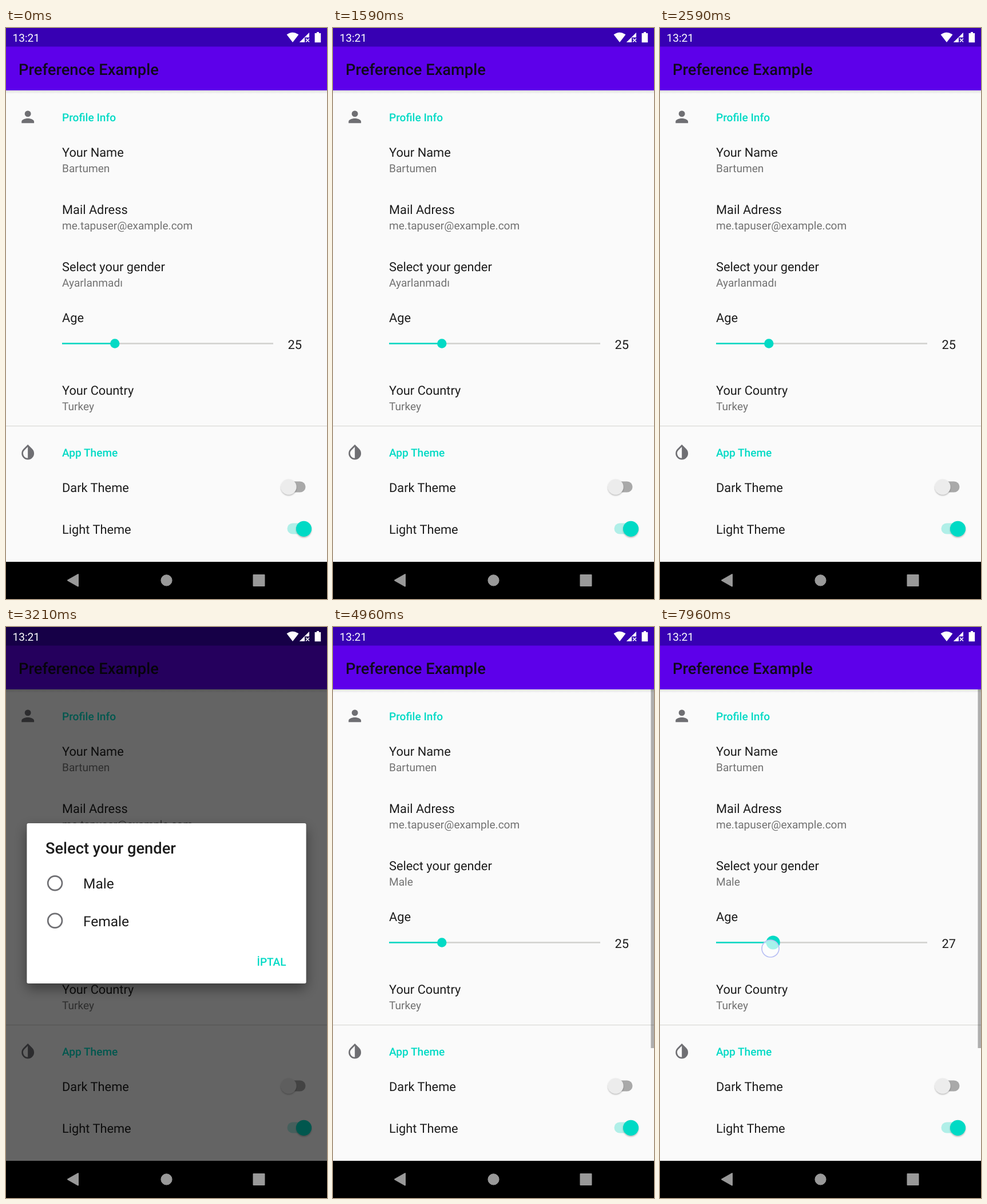
An HTML page for the animation above (8000 ms loop, 561 px wide and 998 px high).

```html
<!DOCTYPE html>
<html lang="en">
<head>
<meta charset="utf-8">
<title>Preference screen</title>
<style>
  html, body { margin: 0; width: 100%; height: 100%; overflow: hidden; background: #000; }
  svg { display: block; width: 100%; height: 100%; }
  text { font: 400 21.8px Roboto, sans-serif; fill: #1d1d1d; text-rendering: geometricPrecision; }
  .sum { font-size: 19.1px; fill: #727272; }
  .cat { font-size: 19.1px; font-weight: 500; fill: #03dac5; }
  .title { font-size: 27.27px; font-weight: 500; fill: #100a1c; }
  .item { font-size: 24.5px; }
  .icon { fill: #6f6f73; }
  .teal { fill: #03dac5; }
</style>
</head>
<body>
<svg viewBox="0 0 561 998">
  <defs>
    <filter id="soft" x="-50%" y="-50%" width="200%" height="200%">
      <feDropShadow dx="0" dy="1.5" stdDeviation="1.3" flood-opacity=".3"/>
    </filter>
    <filter id="deep" x="-20%" y="-20%" width="140%" height="150%">
      <feDropShadow dx="0" dy="9" stdDeviation="11" flood-opacity=".42"/>
    </filter>
    <linearGradient id="edge" x2="0" y2="1">
      <stop stop-opacity=".12"/><stop offset="1" stop-opacity="0"/>
    </linearGradient>
  </defs>

  <rect width="561" height="933" fill="#fafafa"/>
  <rect y="109" width="561" height="6" fill="url(#edge)"/>
  <rect y="32" width="561" height="77" fill="#5d00ea"/>
  <rect width="561" height="32.5" fill="#3700b3"/>
  <text class="title" x="22" y="81.5">Preference Example</text>

  <path class="icon" transform="translate(21.8 139) scale(1.364)"
    d="M12 12a4 4 0 1 0 0-8 4 4 0 0 0 0 8zm0 2c-2.67 0-8 1.34-8 4v2h16v-2c0-2.66-5.33-4-8-4z"/>
  <path class="icon" transform="translate(21.8 725) scale(1.364)"
    d="M17.66 7.93L12 2.27 6.34 7.93a8 8 0 0 0 11.32 11.31 8 8 0 0 0 0-11.31zM12 19.59a6 6 0 0 1-4.24-10.24L12 5.1z"/>
  <g id="prefs"></g>

  <path d="M98 551.5H467" stroke="#d0d0ce" stroke-width="2.7"/>
  <path id="fill" stroke="#03dac5" stroke-width="2.7"/>
  <circle id="thumb" class="teal" cy="551.5"/>
  <text id="age" x="492.5" y="560.5"></text>
  <path d="M0 695.6H561" stroke="#d9d9d6" stroke-width="1.4"/>

  <rect x="490.5" y="792.5" width="33" height="19" rx="9.5" fill="#a9a9a9"/>
  <circle cx="494" cy="802" r="13.6" fill="#ececec" filter="url(#soft)"/>
  <rect x="491.5" y="865.5" width="33" height="19" rx="9.5" fill="#b0efe8"/>
  <circle class="teal" cx="520.5" cy="875.3" r="13.6" filter="url(#soft)"/>
  <rect id="bar" x="555.5" y="109" width="5.5" height="627" fill-opacity=".3"/>

  <rect id="dim" width="561" height="933"/>
  <g id="dialog">
    <rect x="36.5" y="343" width="488" height="280" rx="2.7" fill="#fff" filter="url(#deep)"/>
    <rect id="ripple" x="36.5" y="415" width="488" height="66" fill-opacity=".12"/>
    <text class="title" x="69" y="396" style="fill:#1d1d1d">Select your gender</text>
    <g fill="none" stroke="#6f6f73" stroke-width="2.7">
      <circle cx="85.6" cy="447.7" r="12.4"/><circle cx="85.6" cy="513.2" r="12.4"/>
    </g>
    <text class="item" x="135" y="457">Male</text>
    <text class="item" x="135" y="522.5">Female</text>
    <text class="cat" x="438.5" y="591.5">İPTAL</text>
  </g>
  <circle id="touch" r="15" fill="#fff" fill-opacity=".65" stroke="#b9c0f4" stroke-width="1.7"/>

  <g fill="#fff">
    <text x="11.5" y="24" style="font-size:19.1px;fill:#fff">13:21</text>
    <path d="M501 25L490.6 11.6Q501 4 511.4 11.6z"/>
    <path d="M512.8 25L530 8V16.5H522V25z"/>
    <path d="M524 18.5l6 6m0-6l-6 6" stroke="#fff" stroke-width="1.6"/>
    <path d="M543 7h4v2h3.2v16.2h-10.6V9H543z"/>
  </g>
  <rect y="933" width="561" height="65"/>
  <g fill="#999" stroke="#999" stroke-linejoin="round">
    <path d="M108 965.3L126 955V975.6z" stroke-width="2"/>
    <circle cx="280.5" cy="965.4" r="9.6"/>
    <rect x="432.5" y="956" width="19" height="19" stroke-width="2"/>
  </g>
</svg>
<script>
const $ = id => document.getElementById(id);
const set = (id, attrs) => { for (const k in attrs) $(id).setAttribute(k, attrs[k]); };
const ramp = (t, from, to) => Math.min(1, Math.max(0, (t - from) / (to - from)));

const rows = [
  ["cat", 162.7, "Profile Info"],
  ["", 224.5, "Your Name"], ["sum", 251.5, "Bartumen"],
  ["", 324.5, "Mail Adress"], ["sum", 351.5, "me.tapuser@example.com"],
  ["", 424.5, "Select your gender"], ["sum", 451.5, "", "gender"],
  ["", 513.5, "Age"],
  ["", 640.5, "Your Country"], ["sum", 667.5, "Turkey"],
  ["cat", 748.7, "App Theme"],
  ["", 810.5, "Dark Theme"], ["", 883.5, "Light Theme"]
];
$("prefs").innerHTML = rows.map(([cls, y, label, id = ""]) =>
  `<text class="${cls}" id="${id}" x="98" y="${y}">${label}</text>`).join("");

const OPEN = 2700, PICK = 3890, DRAG = 7380;

function draw(t) {
  // dialog grows in, then fades out together with the dimming
  const enter = ramp(t, OPEN, OPEN + 200);
  const left = 1 - ramp(t, PICK, PICK + 200);
  const scale = 1 - 0.1 * (1 - enter) ** 3;
  set("dim", { "fill-opacity": 0.6 * enter * left });
  set("dialog", {
    opacity: enter * left ** 1.8,
    transform: `translate(280.5 483) scale(${scale}) translate(-280.5 -483)`
  });
  set("ripple", { opacity: ramp(t, 3840, 3890) });
  $("gender").textContent = t < PICK ? "Ayarlanmadı" : "Male";

  // age slider
  const age = t < DRAG ? 25 : 27;
  const x = 98 + 3.69 * age;
  set("fill", { d: `M98 551.5H${x}` });
  set("thumb", { cx: x, r: 8.2 + 3.9 * ramp(t, 7300, 7420) });
  $("age").textContent = age;

  // the scroll bar wakes whenever a value changes
  set("bar", { opacity: t < PICK ? 0 : t < DRAG ? 1 - ramp(t, 5150, 5400) : 1 });

  const sliding = t > 5000;
  set("touch", {
    cx: sliding ? 193 : 150,
    cy: sliding ? 562 : 454,
    opacity: sliding ? +(t >= 7260) : t < 3840 ? 0 : 1 - ramp(t, 3960, 4160)
  });
}

function tick() {
  draw(performance.now() % 8000);
  requestAnimationFrame(tick);
}
tick();
</script>
</body>
</html>
```
